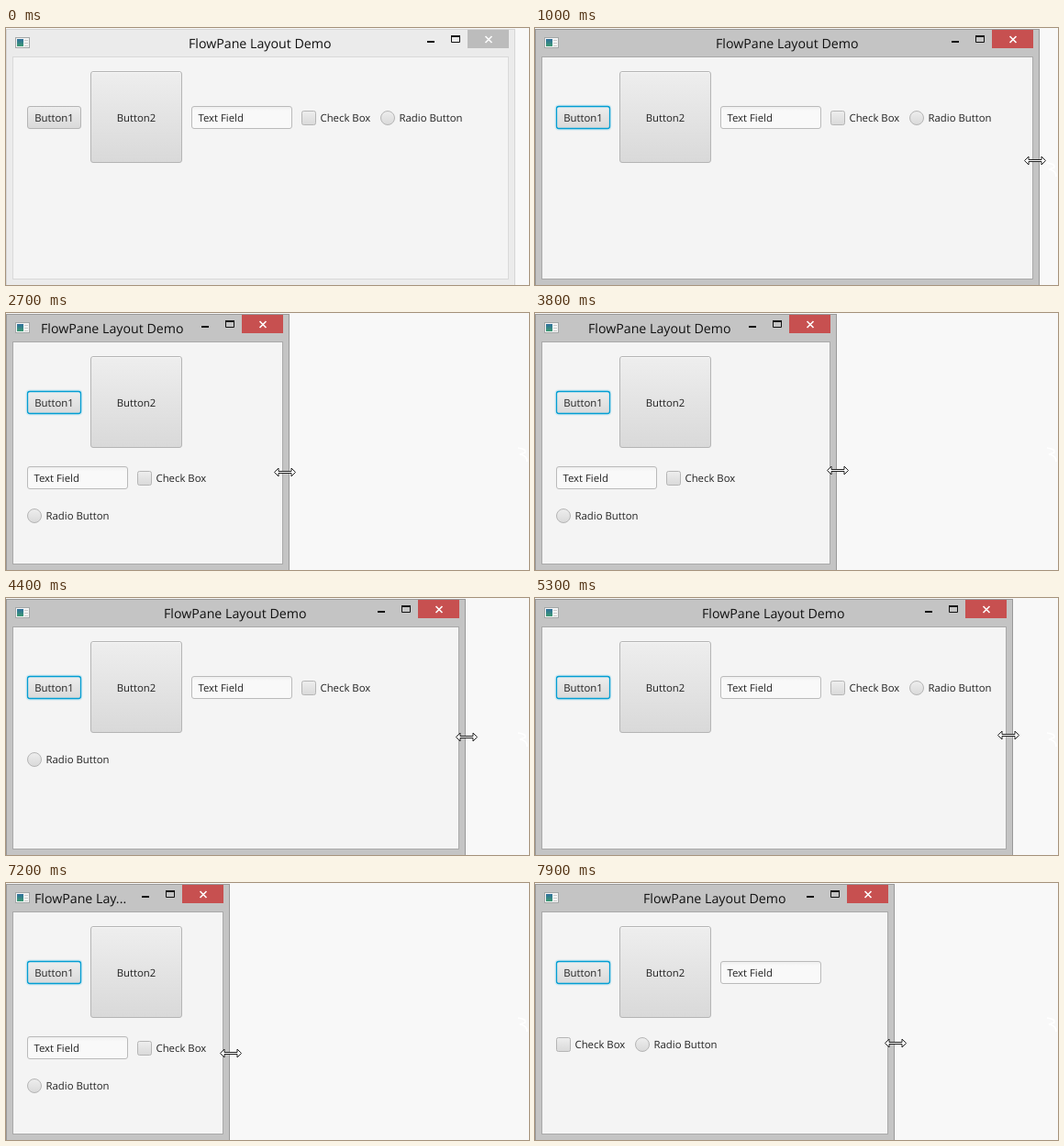
Animation of 570 by 280 pixels, one loop 8000 ms. Source, as an HTML page:

```html
<!DOCTYPE html>
<html lang="en">
<head>
<meta charset="utf-8">
<title>FlowPane Layout Demo</title>
<style>
  html, body { margin: 0; width: 100%; height: 100%; overflow: hidden; background: #f8f8f8; }
  svg { display: block; }
  text { font-family: "Open Sans", "Noto Sans", sans-serif; font-size: 11.35px; fill: #222; text-rendering: geometricPrecision; }
  #title { font-size: 14.2px; fill: #111; }
</style>
</head>
<body>
<svg width="570" height="280" viewBox="0 0 570 280">
  <defs>
    <linearGradient id="face" x2="0" y2="1">
      <stop offset="0" stop-color="#eee"/>
      <stop offset="1" stop-color="#d9d9d9"/>
    </linearGradient>
    <linearGradient id="field" x2="0" y2="1">
      <stop offset="0" stop-color="#efefef"/>
      <stop offset=".2" stop-color="#f9f9f9"/>
    </linearGradient>
    <linearGradient id="teal" x2="0" y2="1">
      <stop offset="0" stop-color="#2f6f9c"/>
      <stop offset="1" stop-color="#3c9a72"/>
    </linearGradient>
    <clipPath id="inside"><rect id="insideBox" x="8" y="32" height="241"/></clipPath>
  </defs>
  <rect width="570" height="280" fill="#f8f8f8"/>
  <path id="trail" d="M558 147q9 1 8 5l-6 2q8 1 8 8" fill="none" stroke="#fff" stroke-width="1.500"/>

  <rect id="frame" x=".5" y="1.500" height="290"/>
  <rect id="pane" x="7.500" y="31.500" height="242" fill="#f4f4f4"/>
  <rect x="10.500" y="10.500" width="15" height="11" fill="#f4f4f4" stroke="#a4a8a8"/>
  <rect x="12" y="12" width="7" height="8" fill="url(#teal)"/>
  <path d="M20 13.500H24M20 16.500H24M20 19.500H24" stroke="#ccc"/>
  <text id="title" y="22"></text>
  <g id="controls">
    <path d="M-96 15H-88" stroke="#111" stroke-width="2"/>
    <path d="M-69.500 9V15.500H-60.500V9" fill="none" stroke="#111"/>
    <path d="M-70 9H-60" stroke="#111" stroke-width="2"/>
    <rect id="close" x="-52" y="2" width="45" height="20"/>
    <path d="M-32.500 9L-25.500 16M-25.500 9L-32.500 16" stroke="#fff" stroke-width="1.600"/>
  </g>

  <g clip-path="url(#inside)">
    <g class="item">
      <rect id="ring" x="-1.400" y="-1.400" width="61.800" height="27.800" rx="4" fill="#039ed3" fill-opacity=".15"/>
      <rect id="edge" x=".5" y=".5" width="58" height="24" rx="2.500" fill="url(#face)"/>
      <text x="29.500" y="17" text-anchor="middle">Button1</text>
    </g>
    <g class="item">
      <rect x=".5" y=".5" width="99" height="99" rx="2.500" fill="url(#face)" stroke="#b5b5b5"/>
      <path d="M2 1.500H98" stroke="#f8f8f8"/>
      <text x="50" y="54.500" text-anchor="middle">Button2</text>
    </g>
    <g class="item">
      <rect x=".5" y=".5" width="109" height="24" rx="2.500" fill="url(#field)" stroke="#bababa"/>
      <text x="7.500" y="17">Text Field</text>
    </g>
    <g class="item">
      <rect x=".5" y="1.500" width="15" height="15" rx="2" fill="url(#face)" stroke="#b5b5b5"/>
      <text x="20.500" y="13">Check Box</text>
    </g>
    <g class="item">
      <circle cx="8" cy="9" r="7.500" fill="url(#face)" stroke="#b5b5b5"/>
      <text x="20.500" y="13">Radio Button</text>
    </g>
  </g>

  <path id="arrow" d="M.5 .5V16L4 12.500L6.500 18.500L9 17.500L6.500 12H11Z" fill="#fff" stroke="#111"/>
  <path id="sizer" d="M-11.500 0L-7 -4.500V-1H7V-4.500L11.500 0L7 4.500V1H-7V4.500Z" fill="#fff" stroke="#222"/>
</svg>
<script>
const LOOP = 8000, STEP = 100, ACTIVE = 900;
const TITLE = "FlowPane Layout Demo";
const LEFT = 23, TOP = 47, HGAP = 10, VGAP = 20;
const SIZES = [[59, 25], [100, 100], [110, 25], [76, 17], [90, 17]];

// Each drag of the right edge: time span, final width, final pointer height.
const START = { width: 555, y: 143.5 };
const DRAGS = [
  { from: 850, to: 2700, width: 309, y: 173 },
  { from: 3600, to: 4700, width: 544, y: 146 },
  { from: 5150, to: 6080, width: 212, y: 187 },
  { from: 6850, to: 8350, width: 442, y: 171 }
];

const $ = id => document.getElementById(id);
const items = [...document.querySelectorAll(".item")];
const pen = document.createElement("canvas").getContext("2d");
pen.font = '14.2px "Open Sans", "Noto Sans", sans-serif';

const set = (id, attrs) => {
  for (const k in attrs) $(id).setAttribute(k, attrs[k]);
};
const move = (el, x, y) => el.setAttribute("transform", `translate(${x} ${y})`);
const show = (id, on) => set(id, { visibility: on ? "visible" : "hidden" });
const lerp = (a, b, p) => a + (b - a) * p;
const smooth = p => p * p * (3 - 2 * p);

// The window trails the pointer while shrinking.
function dragAt(t) {
  let last = START, now = { ...START, lead: -2 };
  for (const d of DRAGS) {
    if (t < d.from) break;
    const p = smooth(Math.min(1, (t - d.from) / (d.to - d.from)));
    now = {
      width: Math.round(lerp(last.width, d.width, p)),
      y: lerp(last.y, d.y, p),
      lead: d.width < last.width ? -5 : 1
    };
    last = d;
  }
  return now;
}

function fitTitle(room) {
  if (pen.measureText(TITLE).width <= room) return TITLE;
  let n = TITLE.length;
  while (n > 1 && pen.measureText(TITLE.slice(0, n) + "...").width > room) n--;
  return TITLE.slice(0, n) + "...";
}

function flow(w) {
  const right = w - 23;
  let x = LEFT, y = TOP, row = [];
  const flush = () => {
    const h = Math.max(...row.map(r => SIZES[r.i][1]));
    for (const r of row) move(items[r.i], r.x, y + Math.ceil((h - SIZES[r.i][1]) / 2));
    y += h + VGAP;
    x = LEFT;
    row = [];
  };
  SIZES.forEach(([sw], i) => {
    if (row.length && x + sw > right) flush();
    row.push({ i, x });
    x += sw + HGAP;
  });
  flush();
}

function drawPointer(t, drag) {
  show("arrow", t >= 200 && t < 600);
  show("sizer", t >= 600);
  const n = (t - 200) / STEP;
  move($("arrow"), 565 - 3 * n, 111 + 11 * n);
  move($("sizer"), drag.width + drag.lead, Math.round(drag.y) + .5);
}

function draw(time) {
  const t = Math.floor(time % LOOP / STEP) * STEP;
  const drag = dragAt(t), w = drag.width, active = t >= ACTIVE;
  set("frame", { width: w - 1, fill: active ? "#c4c4c4" : "#ebebeb", stroke: active ? "#999" : "#d6d6d6" });
  set("pane", { width: w - 15, stroke: active ? "#a9a9a9" : "#d9d9d9" });
  set("insideBox", { width: w - 16 });
  set("close", { fill: active ? "#c75050" : "#bcbcbc" });
  set("edge", { stroke: active ? "#039ed3" : "#b5b5b5", "stroke-width": active ? 1.3 : 1 });
  show("ring", active);
  show("trail", active);
  move($("controls"), w, 0);
  $("title").textContent = fitTitle(w - 140);
  set("title", { x: Math.max(31, Math.min(Math.floor((w - 156) / 2), w - 271)) });
  flow(w);
  drawPointer(t, drag);
}

const begin = performance.now();
function tick() {
  draw(performance.now() - begin);
  requestAnimationFrame(tick);
}
tick();
</script>
</body>
</html>
```
